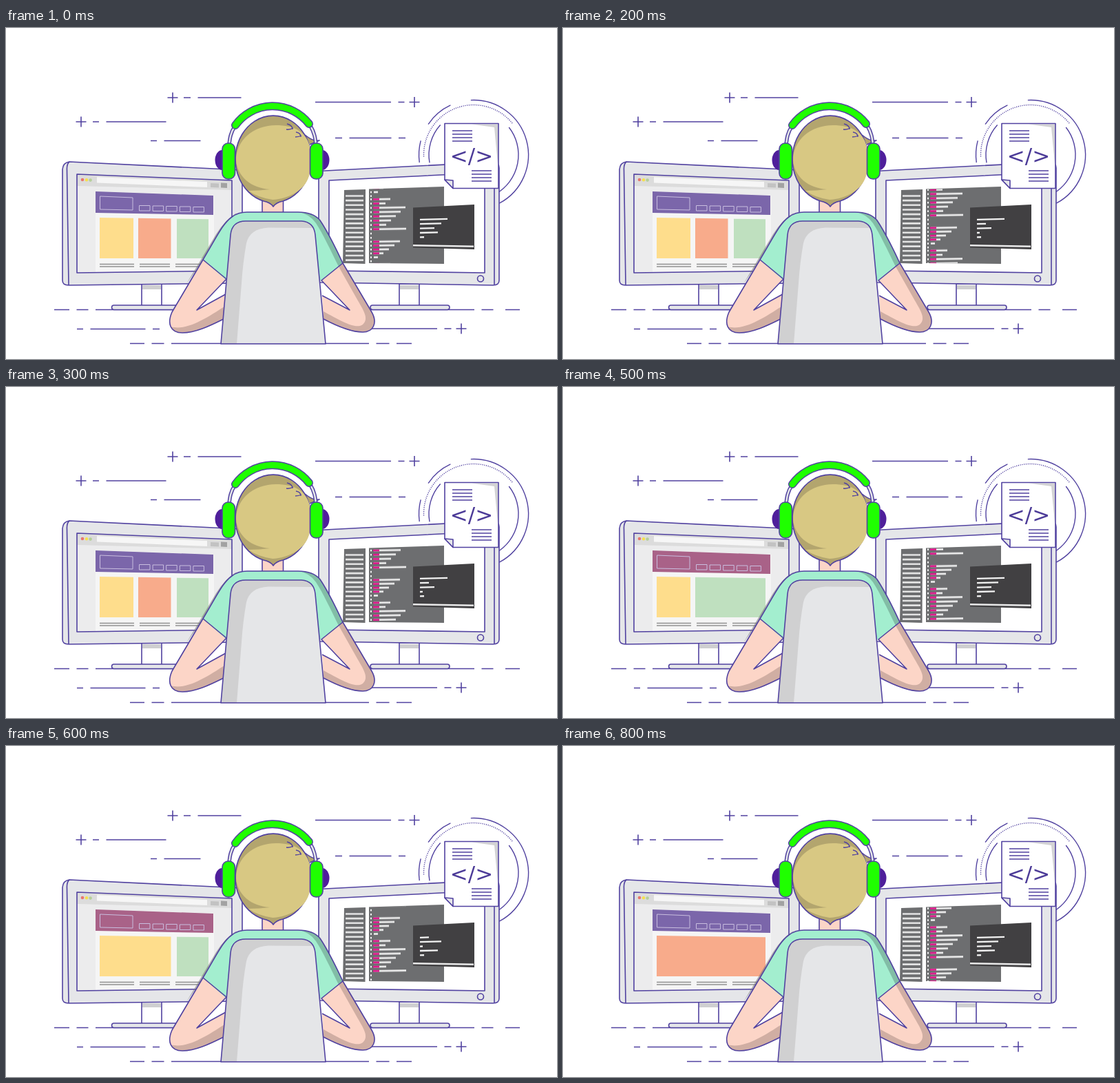
These frames come from a looping animation (800x480 px, 900 ms). An HTML page:

```html
<!DOCTYPE html>
<html lang="en">
<head>
<meta charset="utf-8">
<title>Programmer at work</title>
<style>
html, body { margin: 0; width: 100%; height: 100%; overflow: hidden; background: #fff; }
svg { display: block; width: 800px; height: 480px; }
.ink, .body { stroke: #5142a0; stroke-width: 1.6; stroke-linejoin: round; }
.ink { fill: none; }
.body { fill: #e5e6e9; }
.skin { fill: #fcd5c7; }
.shade { fill: #d0aea3; }
.wire { fill: none; stroke: #c9bedf; stroke-width: 1; }
.sign { font: 31px "DejaVu Sans", sans-serif; fill: #4c3b98; }
#rings { stroke-width: 1.4; }
</style>
</head>
<body>
<svg viewBox="0 0 800 480">
  <defs><clipPath id="pane"><path d="M527 234 636 231V342L527 341Z"/></clipPath></defs>
  <path id="dashes" class="ink"/>
  <g id="rings" class="ink"></g>

  <!-- left monitor -->
  <g class="body">
    <path d="M197 371H226V403H197Z" fill="#fff"/>
    <rect x="153.500" y="402" width="110" height="6.500" rx="3.200"/>
    <path d="M92 194 343 206V370L91 373Q82 373 82 366V205Q83 195 92 194Z"/>
    <path d="M92 194Q88 197 88.500 206L91 373" fill="none"/>
  </g>
  <path d="M198 373H225V379H198Z" fill="#cfcfd1"/>
  <path d="M103 212 328 221V352L103 355Z" fill="#ececed"/>
  <path d="M103 212 328 221V235L103 229Z" fill="#dcdcdc"/>
  <path d="M132 216 292 223V231L132 224.500Z" fill="#f6f6f6"/>
  <path d="M297 225 309 225.500V231.500L297 231Z" fill="#c2c2c2"/>
  <path d="M312 224.500 321 225V232L312 231.500Z" fill="#a2a2a2"/>
  <circle cx="111" cy="220" r="2.300" fill="#e8766f"/>
  <circle cx="117" cy="220.300" r="2.300" fill="#f6e04e"/>
  <circle cx="122.600" cy="220.600" r="2.300" fill="#b5cf9a"/>
  <path d="M130 237 302 243V352L130 354Z" fill="#f5f5f5"/>
  <path id="banner" d="M130 237 301 243V271L130 268Z"/>
  <path class="wire" d="M136.500 244 184 246V264L136.500 263Z"/>
  <path id="nav" class="wire"/>
  <g id="cards"></g>
  <path d="M136 342.500H186M194 342.500H238M246 342.500H290M136 346H186M194 346H238M246 346H290" stroke="#919191" stroke-width="1.500"/>
  <path class="ink" d="M103 212 328 221V352L103 355Z"/>

  <!-- right monitor -->
  <g class="body">
    <path d="M571 371H600V403H571Z" fill="#fff"/>
    <rect x="529" y="402" width="115" height="6.500" rx="3.200"/>
    <path d="M454 207.500 708 194.500Q716 195 716 203V366Q716 373 707 373L454 369Z"/>
    <path d="M709 200V372" fill="none"/>
    <path d="M469 221 695 210V355L469 352Z" style="fill:#fff"/>
    <circle cx="689" cy="363.500" r="4.500"/>
  </g>
  <path d="M572 373H599V379H572Z" fill="#cfcfd1"/>
  <path d="M491 235 522 234 521.500 342 489 341Z" fill="#6d6e70"/>
  <path id="files" stroke="#e3e3e3" stroke-width="2.600"/>
  <path d="M527 233.500 636 230V342L527 341Z" fill="#6d6e70"/>
  <g clip-path="url(#pane)"><g transform="translate(0 8.300) skewY(-.9)"><g id="code"></g></g></g>
  <path d="M591 260.500 680 256V321L591 318.500Z" fill="#414042"/>
  <path d="M591 314 679 315.500V318L591 316.500Z" fill="#e9e9e9"/>
  <g id="shell" stroke="#f2f2f2" stroke-width="2.300"></g>

  <!-- document -->
  <path d="M637 138.500H715V232.500H649L637 220Z" fill="#fff"/>
  <path d="M676 139.500H714.500V203L709 144Z" fill="#d3d3d4"/>
  <path class="ink" d="M637 138.500H715V232.500H649L637 220Z"/>
  <path class="body" d="M649 232.500V221L637 220Z"/>
  <path id="notes" class="ink"/>
  <text class="sign" x="676" y="195.700" text-anchor="middle">&lt;/&gt;</text>

  <!-- arms and shirt -->
  <path d="M335 268Q318 278 305 299L262 371 274 354 286 336 310 300Z" fill="#777" opacity=".55"/>
  <path class="skin" d="M372 248H403V270H372Z"/>
  <path class="ink" d="M372 248V267M402.500 248V267"/>
  <path class="skin" d="M286 336 320 364 277 409 319 386 316 422C296 432 275 442 256 442 238 442 234 428 241 412Z"/>
  <path class="shade" d="M239 433C262 440 292 420 317 404L316 422C296 432 275 442 256 442 246 442 241 439 239 433Z"/>
  <path class="skin" d="M489 341 531 412C540 428 533 441 518 441 500 441 480 432 461 422L459 388 499 409 458 366Z"/>
  <path class="shade" d="M489 341 531 412C540 428 533 441 518 441 500 441 480 432 461 422V411C485 424 508 438 518 430 528 421 518 408 509 392L483 346Z"/>
  <path d="M286 336C306 303 314 284 328 274Q337 267 350 267H424Q446 267 456 279C470 300 480 322 489 341L458 366H320Z" fill="#a3eecf"/>
  <path d="M424 267Q446 267 456 279C470 300 480 322 489 341L483 346C470 320 461 300 450 283Q440 269 424 267Z" fill="#82bda6"/>
  <path class="ink" d="M286 336 320 364 277 409 319 386M489 341 458 366 499 409 459 388"/>
  <path class="ink" d="M316 422C296 432 275 442 256 442 238 442 234 428 241 412L286 336C306 303 314 284 328 274Q337 267 350 267H424Q446 267 456 279C470 300 480 322 489 341L531 412C540 428 533 441 518 441 500 441 480 432 461 422"/>

  <!-- chair -->
  <path d="M312 458 326 300Q328 280 348 280H429Q447 281 449 300L464 458Z" fill="#e5e6e8"/>
  <path d="M312 458 326 300Q328 280 348 280H429Q443 281 447 290L381 289.500Q354 291 349 312 344 340 342 370L335 458Z" fill="#d0d0d1"/>
  <path class="ink" d="M312 458 326 300Q328 280 348 280H429Q447 281 449 300L464 458Z"/>

  <!-- head -->
  <ellipse cx="314" cy="191.500" rx="10.500" ry="14.500" fill="#4f1f9b"/>
  <ellipse cx="459" cy="191.500" rx="10.500" ry="14.500" fill="#4f1f9b"/>
  <path class="ink" style="fill:#b3a56e" d="M434 155Q446 165 455 163L441 169"/>
  <path class="ink" style="fill:#b3a56e" d="M374 251A55 63 0 1 1 402 251Q392 253 388 259 384 253 374 251Z"/>
  <path d="M334 192C334 162 360 141 392 141 418 141 436 150 441 172V210C437 235 410 248 387 249Q366 246 352 236 368 236 383 234C355 232 336 215 334 192Z" fill="#d8c883"/>
  <path class="ink" style="stroke-width:1.300" d="M408 139Q416 141 416 147M407 147Q412 148 417 145M421 151Q428 152 428 158M420 158Q425 158 429 156"/>
  <g id="phones" fill="none" stroke-linecap="round"></g>
  <g class="body" style="fill:#1fff00">
    <rect x="314" y="167" width="18.500" height="52" rx="8.500"/>
    <rect x="441.500" y="167" width="18.500" height="52" rx="8.500"/>
  </g>
</svg>
<script>
const LOOP = 900, FRAMES = 9;
const $ = id => document.getElementById(id);
const repeat = (count, make) => Array.from({ length: count }, (_, i) => make(i));
const draw = (id, parts) => $(id).setAttribute('d', parts.join(''));

function add(parent, tag, attrs) {
  const el = document.createElementNS('http://www.w3.org/2000/svg', tag);
  for (const key in attrs) el.setAttribute(key, attrs[key]);
  return parent.appendChild(el);
}

const play = (el, keyframes, easing = 'linear') =>
  el.animate(keyframes, { duration: LOOP, iterations: Infinity, easing });

// Holds one value per 100 ms step.
function hold(el, prop, valueAt) {
  const keys = repeat(FRAMES, i => ({ [prop]: valueAt(i), offset: i / FRAMES, easing: 'step-end' }));
  play(el, [...keys, { [prop]: valueAt(FRAMES - 1), offset: 1 }]);
}

// Background: dashes of the given lengths, set apart by an even gap.
function strand(x, y, ...lengths) {
  return lengths.map(length => {
    const dash = `M${x} ${y}h${length}`;
    x += length + 10.5;
    return dash;
  }).join('');
}
const plus = (x, y) => `M${x - 7.5} ${y}h15M${x} ${y - 7.5}v15`;

draw('dashes', [
  plus(242, 101), strand(258, 101, 10, 63),
  plus(109, 136), strand(126, 136, 9, 87),
  plus(593, 107.5), strand(449, 107.5, 110, 9),
  plus(661, 436), strand(528, 436, 98, 10),
  strand(210, 163.5, 9, 53), strand(478, 159.5, 10, 61, 10),
  strand(70, 408.5, 22, 17, 120), strand(523, 408.5, 157, 17),
  strand(725, 408.5, 21), strand(103, 436.5, 9, 80, 10),
  strand(180, 457.5, 21, 18, 287, 19, 22)
]);

function arc(r, from, to, attrs = {}) {
  const at = deg => {
    const a = deg * Math.PI / 180;
    return `${679 + r * Math.cos(a)} ${184 + r * Math.sin(a)}`;
  };
  add($('rings'), 'path', { d: `M${at(from)}A${r} ${r} 0 0 1 ${at(to)}`, ...attrs });
}
arc(79.5, -93, 62);
arc(79.5, -146, -115);
arc(79.5, -188, -165);
arc(72.5, -182, -38, { 'stroke-dasharray': '1.2 1.6' });
arc(65, -190, -138);
arc(65, -38, 60);

draw('notes', repeat(4, i => `M648 ${149 + i * 5}h29M676 ${207 + i * 5}h29`));

// Web page
draw('nav', repeat(5, i => `M${193.5 + i * 19.6} ${257.5 + i * .5}h15.5v7.5h-15.5z`));
hold($('banner'), 'fill', i => i >= 4 && i <= 6 ? '#a96288' : '#7b66aa');

// Each card spans columns first to last.
function layout(from, to, ...cards) {
  const group = add($('cards'), 'g', {});
  for (const [first, last, fill] of cards) {
    const left = 136 + first * 56, right = 185 + last * 54.5;
    const top = x => 275 + (x - 136) * .015;
    add(group, 'path', { fill, d: `M${left} ${top(left)}L${right} ${top(right)}V334H${left}Z` });
  }
  hold(group, 'opacity', i => +(i >= from && i <= to));
}
const yellow = '#fedd8c', orange = '#f8ab8b', green = '#bfe0bf';
layout(0, 3, [0, 0, yellow], [1, 1, orange], [2, 2, green]);
layout(4, 5, [0, 0, yellow], [1, 2, green]);
layout(6, 6, [0, 1, yellow], [2, 2, green]);
layout(7, 8, [0, 2, orange]);

// Editor: two blocks of code repeat while the text scrolls up.
draw('files', repeat(15, i => `M493 ${243.5 + i * 6.65}H519`));

const PERIOD = 94.5;
const bar = (x, y, width, fill) => add($('code'), 'rect', { x, y, width, height: 2.6, fill });

function codeBlock(top, pitch, count, lengthAt) {
  for (let i = 0; i < count; i++) {
    const y = top + i * pitch, length = lengthAt(i);
    bar(529, y, 2, '#f2f2f2');
    if (length > 0) bar(534, y, length, '#f2f2f2');
    if (length > 8) bar(533, y, 9, '#e0148c');
  }
}
for (let top = 308.7 - PERIOD; top < 308.7 + 2 * PERIOD; top += PERIOD) {
  codeBlock(top, 5.65, 6, i => i < 5 ? 38 - 8 * i : 0);
  codeBlock(top + 33, 6.2, 10, i => i < 8 ? 17 + (43 - 7 * i) % 36 + (i > 6 ? 36 : 0) : 0);
}
play($('code'), [{ transform: 'translateY(0)' }, { transform: 'translateY(-90px)' }], `steps(${FRAMES})`);

// Terminal: odd lines, then even lines, shrink for two steps.
[40, 31, 21, 26, 6].forEach((length, i) => {
  const y = 277.8 + i * 6.4, start = i % 2 ? 2 : 6;
  const brief = Math.min(length, i < 2 ? 13 : i < 4 ? 4 : length);
  const line = add($('shell'), 'path', { d: `M601 ${y}l${length} ${-length * .025}` });
  hold(line, 'strokeDasharray', f => `${f === start || f === start + 1 ? brief : length + 1} 99`);
});

// Headphones: an outline under a thinner fill.
function tube(d, width, color) {
  add($('phones'), 'path', { d, stroke: '#5142a0', 'stroke-width': width });
  add($('phones'), 'path', { d, stroke: color, 'stroke-width': width - 3 });
}
tube('M332 143C326 152 325 160 324 169', 5.5, '#e5e6e9');
tube('M442 142C448 152 449 160 450 169', 5.5, '#e5e6e9');
tube('M333 141A67 67 0 0 1 440 139', 12, '#1fff00');
</script>
</body>
</html>
```
